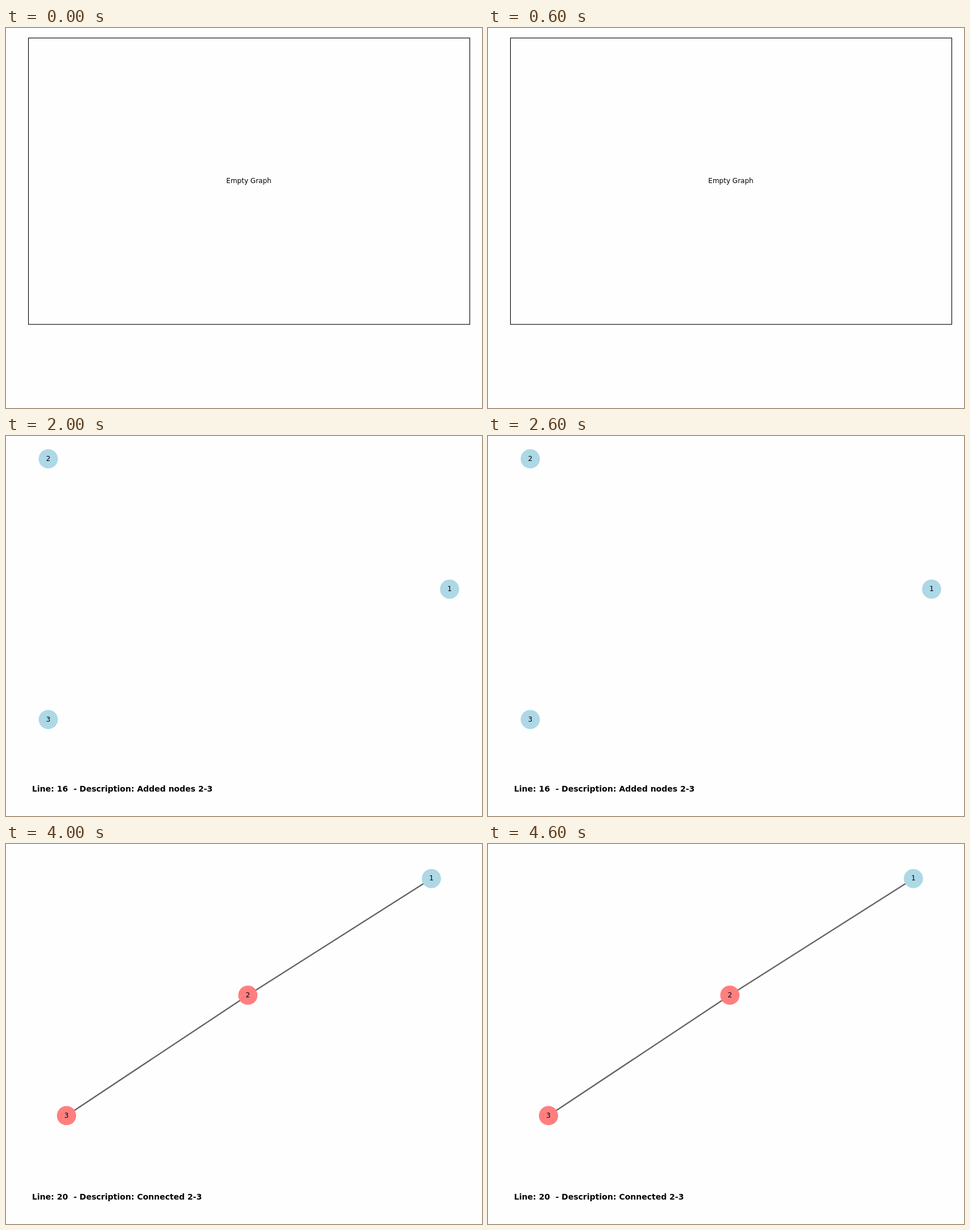
These frames come from a looping animation (837x669 px, 5000 ms). An HTML page:

```html
<!DOCTYPE html>
<html lang="en">
<head>
<meta charset="utf-8">
<title>Building a graph</title>
<style>
  html, body { margin: 0; width: 100%; height: 100%; overflow: hidden; background: #fefefe; }
  svg { display: block; width: 837px; height: 669px; }
  text { font: 12px "DejaVu Sans", sans-serif; text-anchor: middle; white-space: pre; }
  #caption { font-size: 14px; font-weight: bold; text-anchor: start; }
</style>
</head>
<body>
<svg viewBox="0 0 837 669">
  <g id="graph"></g>
  <text id="caption" x="45.8" y="625.7"></text>
</svg>
<script>
const STEP_MS = 1000;
const BLUE = "#add8e6", PINK = "#ff7f7f", RED = "#ff0000", GREY = "#636363";

// Nodes are listed in label order as [x, y, fill]; edges as [from, to, stroke].
const steps = [
  { empty: true, nodes: [], edges: [], caption: "" },
  {
    nodes: [[427.3, 269.6, BLUE]],
    edges: [],
    caption: "Line: 14  - Description: Added node 1"
  },
  {
    nodes: [[780, 269.6, BLUE], [74.3, 40.2, BLUE], [74.3, 499.1, BLUE]],
    edges: [],
    caption: "Line: 16  - Description: Added nodes 2-3"
  },
  {
    nodes: [[755, 193.2, BLUE], [256.6, 47.4, BLUE], [74.3, 499.1, BLUE]],
    edges: [[1, 2, RED]],
    caption: "Line: 18  - Description: Connected 1-2"
  },
  {
    nodes: [[748, 60.9, BLUE], [425.3, 266.2, PINK], [106.4, 478.2, PINK]],
    edges: [[1, 2, GREY], [2, 3, GREY]],
    caption: "Line: 20  - Description: Connected 2-3"
  }
];

const graph = document.getElementById("graph");
const caption = document.getElementById("caption");

const emptyGraph = () =>
  `<rect x="39.5" y="17.6" width="776" height="504.2" fill="none" stroke="#000" stroke-width="1.1"/>
   <text x="427" y="272.9">Empty Graph</text>`;

const edge = ([x1, y1], [x2, y2], color) =>
  `<line x1="${x1}" y1="${y1}" x2="${x2}" y2="${y2}" stroke="${color}" stroke-width="2.35"/>`;

const node = ([x, y, fill], i) =>
  `<circle cx="${x}" cy="${y}" r="16.9" fill="${fill}"/>
   <text x="${x}" y="${y + 3.5}">${i + 1}</text>`;

function show({ empty, nodes, edges, caption: label }) {
  graph.innerHTML = (empty ? emptyGraph() : "")
    + edges.map(([a, b, color]) => edge(nodes[a - 1], nodes[b - 1], color)).join("")
    + nodes.map(node).join("");
  caption.textContent = label;
}

let current = 0;
const start = performance.now();

function tick() {
  const elapsed = performance.now() - start;
  const index = Math.floor(elapsed / STEP_MS) % steps.length;
  if (index !== current) show(steps[current = index]);
  requestAnimationFrame(tick);
}

show(steps[0]);
requestAnimationFrame(tick);
</script>
</body>
</html>
```
